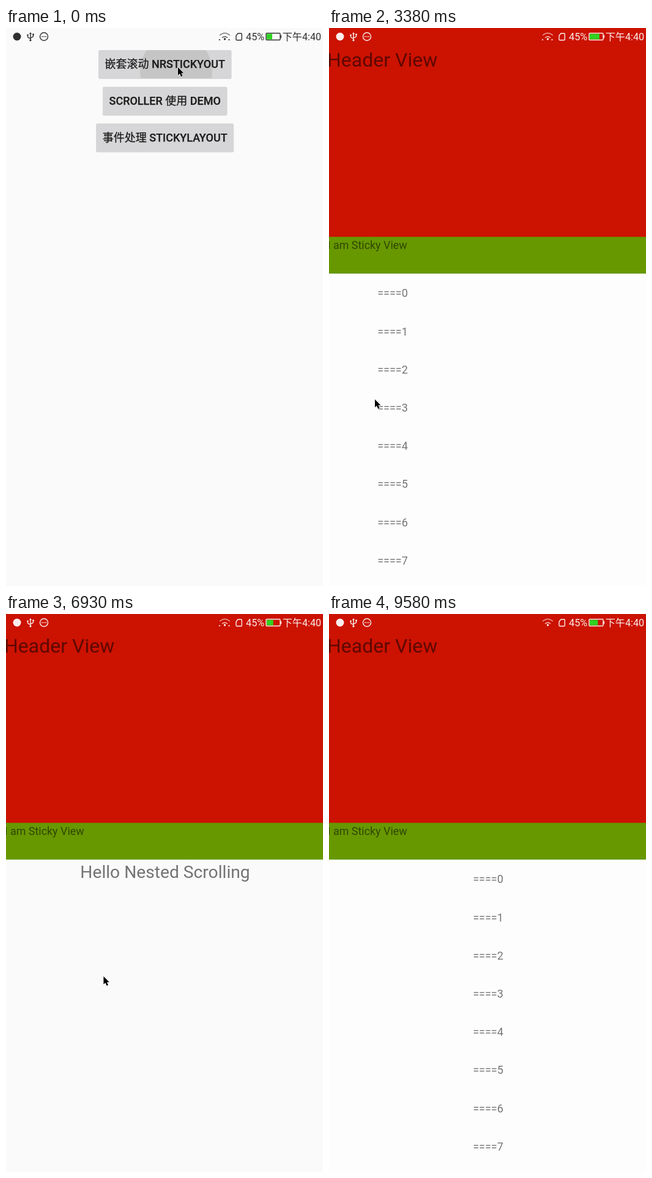
An HTML page that plays this animation: 518 px wide and 909 px high, repeating every 10000 ms.

```html
<!DOCTYPE html>
<html lang="zh-CN">
<head>
<meta charset="utf-8">
<title>Nested scrolling</title>
<style>
  html, body { margin: 0; width: 100%; height: 100%; overflow: hidden; background: #fafafa; }
  svg { display: block; width: 100vw; height: 100vh; }
  text { font-family: Roboto, "Noto Sans CJK SC", "Noto Sans CJK", sans-serif; white-space: pre; }
  .soft { fill: #000; fill-opacity: .54; }
  .row { font-size: 18px; text-anchor: middle; }
  .btn { font-size: 18px; font-weight: 500; text-anchor: middle; fill: #1d1d1d; stroke: #1d1d1d; stroke-width: .25; }
  .line { fill: none; stroke: currentColor; stroke-width: 1.4; }
</style>
</head>
<body>
<svg viewBox="0 0 518 909" preserveAspectRatio="none">
  <defs>
    <clipPath id="btnClip"><rect x="152" y="36" width="215.5" height="46" rx="2"/></clipPath>
  </defs>
  <rect width="518" height="909" fill="#fafafa"/>

  <g id="menu">
    <g id="buttons"></g>
    <circle id="ripple" cx="278" cy="70" fill="#c5c5c5" clip-path="url(#btnClip)"/>
    <g id="labels"></g>
  </g>

  <g id="app">
    <g id="listPage">
      <rect width="1036" height="909" fill="#fdfdfd"/>
      <g id="rows"></g>
    </g>
    <g id="helloPage">
      <rect width="518" height="1300" fill="#fafafa"/>
      <text class="soft" x="260" y="429.5" font-size="28.2" text-anchor="middle">Hello Nested Scrolling</text>
    </g>
    <circle id="glow" cx="259" r="2260" fill="#3f51b5" fill-opacity=".17"/>
    <g id="header">
      <rect y="-30" width="518" height="371" fill="#cc1200"/>
      <text class="soft" x="-3" y="62.5" font-size="32">Header View</text>
      <rect y="340.2" width="518" height="59.9" fill="#679800"/>
      <text class="soft" x="-2.3" y="359.5" font-size="17.9">I am Sticky View</text>
    </g>
    <rect width="518" height="28.5" fill="#cc1200"/>
  </g>

  <g id="status">
    <circle cx="18" cy="14" r="6.5" fill="currentColor"/>
    <g class="line">
      <path d="M40 8V20M35.5 11.5V14Q35.5 16 40 17M44.5 10.5V13Q44.5 15 40 16"/>
      <circle cx="62" cy="14" r="6.5"/>
      <path d="M376 12.5L379 8.7H384Q385.3 8.7 385.3 10V18.5Q385.3 19.8 384 19.8H377.3Q376 19.8 376 18.5Z"/>
      <path d="M353 16Q357.5 12 362 16" stroke-opacity=".8"/>
      <path d="M349 12Q357.5 4.5 366 12" stroke-opacity=".6"/>
      <rect x="425" y="8.5" width="23" height="11" rx="1"/>
    </g>
    <g fill="currentColor">
      <path d="M38 10L40 6.8L42 10Z"/>
      <circle cx="40" cy="20" r="1.6"/>
      <circle cx="35.5" cy="11.5" r="1.3"/>
      <rect x="43.3" y="9.3" width="2.5" height="2.5"/>
      <circle cx="59" cy="14" r=".9"/><circle cx="62" cy="14" r=".9"/><circle cx="65" cy="14" r=".9"/>
      <circle cx="357.5" cy="18" r="1.7"/>
      <path id="traffic" d="M349 17.5L350.5 20H347.5ZM364.5 17.5L366 20H363Z"/>
      <rect x="448.5" y="11.5" width="1.6" height="5"/>
      <text x="392" y="20" font-size="16.3">45%</text>
      <text x="515" y="20" font-size="16.1" text-anchor="end">下午4:40</text>
    </g>
    <rect id="charge" x="426" y="9.5" height="9" fill="#2fd321"/>
  </g>

  <path id="cursor" d="M0 0V13L3 10.3L5.1 15.2L7.6 14.1L5.4 9.4H9.4Z" fill="#000" stroke="#fff" stroke-width="1.1" stroke-linejoin="round" paint-order="stroke"/>
</svg>
<script>
const LOOP = 10000, STEP = 147, LAST = 65;
const WIDTH = 518, COLLAPSE = 311.5, PITCH = 62.2, BOTTOM = 2599.8, PEEK = 441.4;

const $ = id => document.getElementById(id);
const set = (el, attrs) => { for (const k in attrs) el.setAttribute(k, attrs[k]); return el; };
const make = (parent, tag, attrs, label = "") => {
  const el = set(document.createElementNS("http://www.w3.org/2000/svg", tag), attrs);
  el.textContent = label;
  return parent.appendChild(el);
};
const show = (id, on) => set($(id), { visibility: on ? "visible" : "hidden" });
const move = (id, x, y) => set($(id), { transform: `translate(${x} ${y})` });

// Eased progress from 0 to 1 between two steps.
const ease = (s, from, to) => {
  const u = Math.min(1, Math.max(0, (s - from) / (to - from)));
  return u * u * (3 - 2 * u);
};
// Out and back again.
const trip = (s, out, arrive, leave, home) => ease(s, out, arrive) - ease(s, leave, home);

const scrollAt = s =>
  BOTTOM * trip(s, 8, 15, 17, 22) + COLLAPSE * trip(s, 33, 36.5, 41, 45) + PEEK * trip(s, 51, 55, 57, 63);
const swipeAt = s => -WIDTH * trip(s, 21.5, 25.62, 48, 51);

const stops = [
  { s: 0, x: 281, y: 64 }, { s: 6, x: 272, y: 510 }, { s: 15, x: 271, y: 642 }, { s: 23, x: 75, y: 605 },
  { s: 32, x: 275, y: 620 }, { s: 37, x: 272, y: 163 }, { s: 45, x: 272, y: 620 }, { s: 48, x: 120, y: 580 },
  { s: 51, x: 420, y: 600 }, { s: 55, x: 319, y: 155 }, { s: 64, x: 300, y: 400 }
];
const pointerAt = (s, axis) => stops.slice(1).reduce(
  (v, stop, i) => v + (stop[axis] - stops[i][axis]) * ease(s, stops[i].s, stop.s), stops[0][axis]);

["嵌套滚动 NRSTICKYOUT", "SCROLLER 使用 DEMO", "事件处理 STICKYLAYOUT"].forEach((label, i) => {
  const y = 36 + i * 59.8, mid = 259.7;
  const text = make($("labels"), "text", { x: mid, y: y + 29.3, class: "btn" }, label);
  const width = text.getComputedTextLength() + 21;
  const box = { x: mid - width / 2, y, width, height: 46, rx: 2 };
  make($("buttons"), "rect", { ...box, y: y + 1, fill: "#000", "fill-opacity": .15 });
  make($("buttons"), "rect", { ...box, fill: "#d6d5d7" });
});
for (let i = 0; i < 50; i++)
  make($("rows"), "text", { x: 260, y: 438.4 + i * PITCH, class: "row soft" }, "====" + i);

function draw(ms) {
  const s = Math.min(LAST, Math.floor(ms / STEP + .07));
  const inApp = s > 2, offset = scrollAt(s), page = swipeAt(s);
  const fold = Math.min(offset, COLLAPSE);
  const glow = 36 * Math.max(0, 1 - Math.abs(s - 15) / 2);

  show("menu", !inApp);
  show("app", inApp);
  set($("ripple"), { r: 59 + s * 65 });
  move("listPage", page, 0);
  move("rows", 0, -offset);
  move("helloPage", page + WIDTH, -fold);
  // The second page only appears once the drag is released.
  $("helloPage").style.display = s > 24 && s < 51 ? "" : "none";
  move("header", 0, -fold);
  set($("glow"), { cy: 909 - glow + 2260 });

  $("status").style.color = inApp ? "#fbeeec" : "#303030";
  show("traffic", s % 25 !== 15);
  set($("charge"), { width: 9 + 12 * (s % 15) / 14 });

  move("cursor", pointerAt(s, "x"), pointerAt(s, "y"));
  show("cursor", s < LAST);
}

const start = performance.now();
function tick() {
  draw((performance.now() - start) % LOOP);
  requestAnimationFrame(tick);
}
tick();
</script>
</body>
</html>
```
